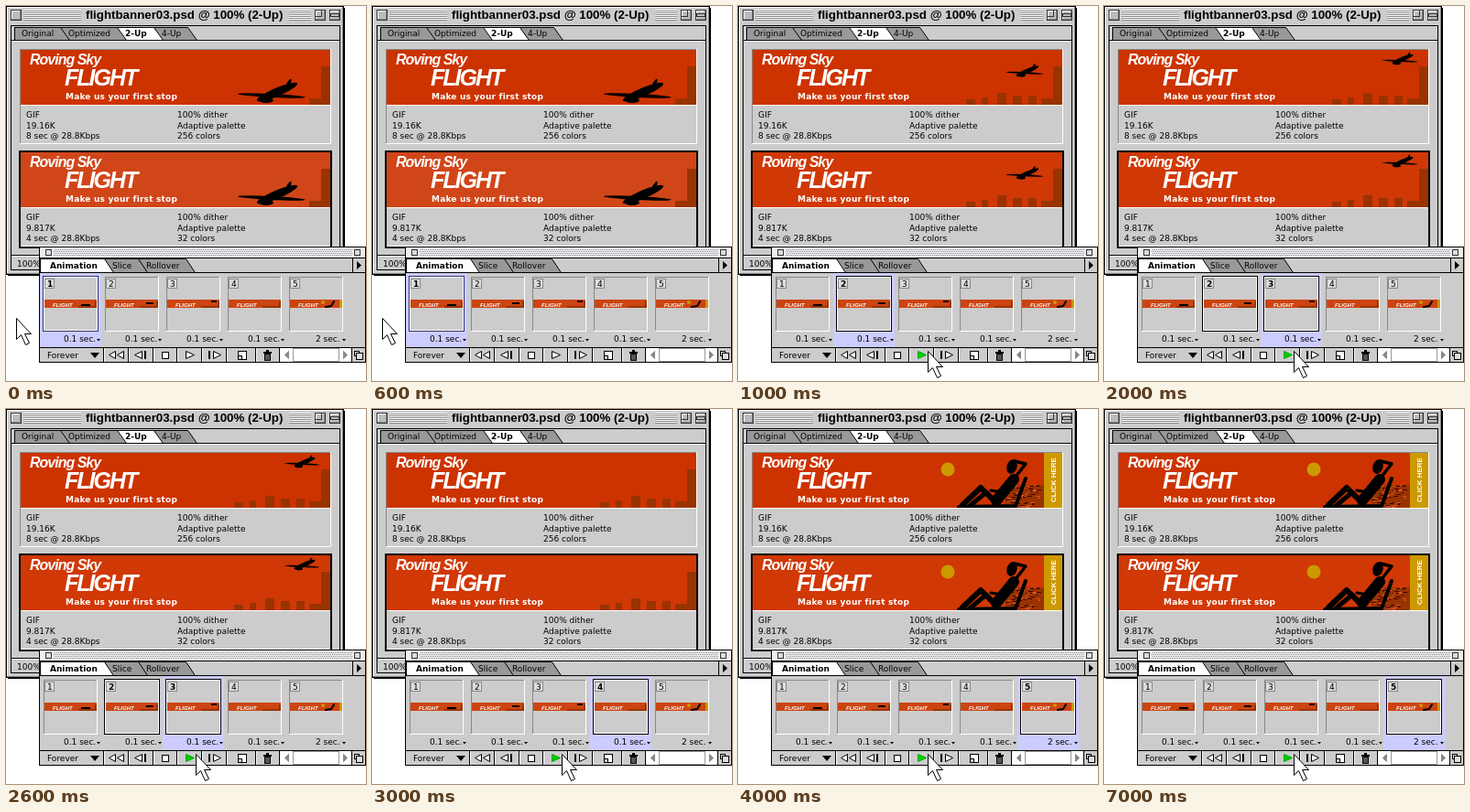
Animation, 393 px wide and 410 px high, one loop 9000 ms. Source, as an HTML page with a canvas:

```html
<!DOCTYPE html>
<html lang="en">
<head>
<meta charset="utf-8">
<style>
html, body { margin: 0; width: 100%; height: 100%; overflow: hidden; background: #fff; }
canvas { display: block; }
</style>
</head>
<body>
<canvas id="stage" width="393" height="410"></canvas>
<script>
const c = document.getElementById('stage').getContext('2d');
const SMALL = '9px "DejaVu Sans", sans-serif', BOLD = 'bold ' + SMALL;
const HEAD = '"Liberation Sans", Arial, sans-serif';
const GRAY = '#ccc', LILAC = '#ccf', RED = '#c30', DARK = '#930', GOLD = '#c90', BLACK = '#000';

function rect(x, y, w, h, fill) {
  c.fillStyle = fill;
  c.fillRect(x, y, w, h);
}
function frame(x, y, w, h, topLeft = BLACK, bottomRight = topLeft) {
  rect(x, y, w, 1, topLeft);
  rect(x, y, 1, h, topLeft);
  rect(x, y + h - 1, w, 1, bottomRight);
  rect(x + w - 1, y, 1, h, bottomRight);
}
function box(x, y, w, h, fill, line) {
  rect(x, y, w, h, fill);
  frame(x, y, w, h, line);
}
function path(points) {
  c.beginPath();
  for (let i = 0; i < points.length; i += 2) c.lineTo(points[i], points[i + 1]);
}
function poly(points, fill, line) {
  path(points);
  c.closePath();
  c.fillStyle = fill;
  c.fill();
  if (!line) return;
  c.lineWidth = 1;
  c.strokeStyle = line;
  c.stroke();
}
function limb(width, ...points) {
  path(points);
  c.lineWidth = width;
  c.lineCap = c.lineJoin = 'round';
  c.strokeStyle = BLACK;
  c.stroke();
}
function oval(x, y, rx, ry, tilt = 0, fill = BLACK) {
  c.beginPath();
  c.ellipse(x, y, rx, ry, tilt, 0, 7);
  c.fillStyle = fill;
  c.fill();
}
function text(s, x, y, font = SMALL, fill = BLACK, spacing = 0) {
  c.font = font;
  c.letterSpacing = spacing + 'px';
  c.fillStyle = fill;
  c.fillText(s, x, y);
}
// Runs draw with the origin moved, scaled and turned
function at(x, y, draw, scale = 1, turn = 0) {
  c.save();
  c.translate(x, y);
  c.scale(scale, scale);
  c.rotate(turn);
  draw();
  c.restore();
}
function random(seed) {
  return () => (seed = seed * 16807 % 2147483647) / 2147483647;
}
function stripes(x, y, w) {
  for (let i = 0; i < 6; i++) {
    rect(x, y + i * 2, w, 1, '#fff');
    rect(x, y + i * 2 + 1, w, 1, '#888');
  }
}

// Labels follow one another; each tab slants down at its right end
function tabs(labels, active, left, x, top, bottom) {
  const list = labels.map((label, i) => {
    const font = i === active ? BOLD : SMALL, start = x;
    c.font = font;
    c.letterSpacing = '0px';
    x += Math.round(c.measureText(label).width) + 16;
    return { label, font, start, end: x + 1.5, fill: i === active ? '#fff' : '#999' };
  });
  for (const t of list.reverse()) {
    poly([left + .5, top + .5, t.end - 10, top + .5, t.end, bottom + .5, left + .5, bottom + .5],
      t.fill, BLACK);
    text(t.label, t.start, bottom - 4, t.font);
  }
}

function plane() {
  oval(0, 0, 24, 4.5, -.4);
  oval(-6, 4, 37, 2, .05);
  oval(12, -8, 7, 2, -1.1);
  oval(-12, 9, 8, 3);
}

function skyline(whole) {
  rect(327, 16, 10, 42, DARK);
  rect(314, 51, 13, 7, DARK);
  if (!whole) return;
  const rnd = random(11);
  for (let x = 232; x < 325; x += 17) {
    const h = 6 + rnd() * 9 | 0;
    rect(x, 58 - h, 7 + rnd() * 8 | 0, h, DARK);
  }
}

function beach() {
  const rnd = random(5);
  rect(275, 33, 42, 25, DARK);
  for (let i = 0; i < 70; i++) {
    rect(275 + rnd() * 37 | 0, 33 + rnd() * 25 | 0, 2 + rnd() * 4 | 0, 1, i % 2 ? '#d52' : '#400');
  }
  oval(212, 16, 7.5, 7.5, 0, GOLD);
  limb(6, 228, 55, 248, 36, 264, 52);
  limb(5, 236, 56, 254, 41, 266, 53);
  limb(12, 265, 50, 284, 27);
  oval(282, 13, 5.5, 8, .3);
  limb(3.5, 286, 24, 297, 10, 285, 7);
  limb(3, 281, 29, 272, 41, 259, 39);
  limb(4, 224, 57, 286, 56, 297, 26);
  rect(317, -2, 20, 60, GOLD);
  at(330, 52, () => text('CLICK HERE', 0, 0, 'bold 8px ' + HEAD, '#fff'), 1, -Math.PI / 2);
}

function banner(y, color, n) {
  at(17, y, () => {
    c.beginPath();
    c.rect(-1, -2, 338, 60);
    c.clip();
    rect(-1, -2, 338, 60, color);
    if (n < 4) skyline(n > 0);
    else beach();
    if (n === 0) at(279, 44, plane);
    if (n === 1) at(299, 21, plane, .55);
    if (n === 2) at(309, 8, plane, .52);
    text('Roving Sky', 9, 14, 'italic bold 16px ' + HEAD, '#fff', -1);
    text('FLIGHT', 47, 37, 'italic bold 25px ' + HEAD, '#fff', -2);
    text('Make us your first stop', 48, 52, BOLD, '#fff', .2);
  });
}

function panel(y, color, n, info) {
  frame(15, y - 3, 340, 104, '#888', '#fff');
  banner(y, color, n);
  rect(16, y + 58, 338, 1, '#fff');
  info.forEach((s, i) => text(s, i < 3 ? 22 : 187, y + 72 + i % 3 * 11.5));
}

function mainWindow(n) {
  rect(2, 2, 368, 293, BLACK);
  box(0, 0, 369, 294, GRAY);
  frame(1, 1, 367, 292, '#fff', '#888');
  stripes(19, 4, 63);
  stripes(309, 4, 24);
  for (const x of [5, 337, 353]) {
    box(x, 4, 12, 12, '#bbb', '#333');
    frame(x + 1, 5, 10, 10, '#fff', '#888');
  }
  frame(337, 4, 8, 8, '#333');
  frame(354, 8, 10, 4, '#333');
  text('flightbanner03.psd @ 100% (2-Up)', 87, 14, 'bold 13.3px ' + HEAD);

  frame(5, 21, 360, 268);
  tabs(['Original', 'Optimized', '2-Up', '4-Up'], 2, 9, 17, 23, 37);
  rect(6, 37, 358, 1, BLACK);
  rect(6, 38, 358, 1, '#fff');

  panel(50, RED, n, ['GIF', '19.16K', '8 sec @ 28.8Kbps',
    '100% dither', 'Adaptive palette', '256 colors']);
  panel(162, n ? '#d03806' : '#d04619', n, ['GIF', '9.817K', '4 sec @ 28.8Kbps',
    '100% dither', 'Adaptive palette', '32 colors']);
  frame(14, 158, 342, 107);
  frame(15, 159, 340, 105);
  rect(6, 272, 358, 1, BLACK);
  rect(6, 273, 358, 1, '#fff');
  text('100%', 12, 285);
}

function cell(i, n) {
  const on = i === n, marked = on || i === 1 && n === 2;
  at(37 + i * 67, 292, () => {
    if (on) rect(0, 0, 67, 81, LILAC);
    rect(4, 4, 59, 60, GRAY);
    frame(4, 4, 59, 60, '#888', '#fff');
    if (marked) {
      frame(3, 3, 61, 61, n ? BLACK : '#336');
      frame(4, 4, 59, 59, '#fff');
    }
    box(5, 6, 11, 11, '#ddd', '#888');
    text(i + 1, 8, 15, marked ? BOLD : SMALL);
    rect(5, 29, 57, 9, '#c41');
    text('FLIGHT', 14, 37, 'italic bold 6px ' + HEAD, '#fff');
    if (i < 4) {
      rect(42, 36, 20, 2, DARK);
      rect(60, 31, 2, 7, DARK);
      if (i < 3) rect(45 + i * 4, 34 - i * 2, 10 - i * 2, 2, BLACK);
    } else {
      oval(41, 32, 2, 2, 0, GOLD);
      limb(2, 44, 37, 50, 36, 53, 31);
      rect(59, 29, 3, 9, GOLD);
    }
    text(i < 4 ? '0.1 sec.' : '2 sec.', i < 4 ? 26 : 33, 75);
    poly([62, 72, 66, 72, 64, 74.5], BLACK);
  });
}

// Sideways triangle; a negative width points left
function arrow(x, w, fill = '#fff', line = BLACK) {
  poly([x + .5, 377.5, x + w + .5, 381.5, x + .5, 385.5], fill, line);
}

function controls(playing) {
  rect(37, 373, 355, 16, GRAY);
  rect(299, 374, 78, 15, '#fff');
  frame(313, 374, 51, 15, '#999');
  rect(37, 373, 355, 1, BLACK);
  for (let i = 0; i < 8; i++) {
    const x = Math.round(106 + i * 26.75) + (i > 5 ? 5 : 0);
    rect(x, 374, 1, 15, BLACK);
    rect(x + 1, 374, 1, 15, '#fff');
  }
  text('Forever', 45, 385);
  poly([92, 379, 102, 379, 97, 385], BLACK);
  arrow(119, -7);
  arrow(128, -7);
  arrow(148, -8);
  rect(151, 377, 2, 9, BLACK);
  box(170, 378, 8, 8, '#fff');
  if (playing) arrow(196, 9, '#0c0', '#0a0');
  else arrow(196, 9);
  rect(221, 377, 2, 9, BLACK);
  arrow(226, 8);
  box(253, 377, 10, 10, '#fff');
  box(253, 382, 5, 5, GRAY);
  rect(281, 378, 9, 2, BLACK);
  rect(284, 376, 3, 2, BLACK);
  box(282, 380, 7, 8, '#555');
  arrow(308, -4, '#888', '#888');
  arrow(368, 4, '#888', '#888');
  rect(377, 374, 1, 15, BLACK);
  box(380, 377, 6, 6, '#ddd');
  box(382, 379, 8, 8, '#ddd');
}

function palette(n) {
  box(36, 263, 357, 127, GRAY);
  rect(37, 264, 355, 11, '#eee');
  for (let x = 52; x < 377; x += 2) {
    for (let y = 266; y < 273; y += 2) rect(x + y / 2 % 2, y, 1, 1, '#889');
  }
  for (const x of [43, 380]) box(x, 266, 7, 7, '#ddd', '#333');
  rect(37, 275, 355, 1, BLACK);
  tabs(['Animation', 'Slice', 'Rollover'], 0, 37, 48, 276, 291);
  rect(37, 291, 355, 1, BLACK);
  frame(378, 275, 15, 17);
  poly([383, 279, 388, 283.5, 383, 288], BLACK);
  for (let i = 0; i < 5; i++) cell(i, n);
  controls(n > 0);
}

function cursor(x, y) {
  at(x + .5, y + .5, () => poly([0, 0, 0, 23, 5, 18, 10, 29, 14, 27, 9, 17, 16, 17], '#fff', BLACK));
}

function draw(now) {
  const n = Math.min(4, Math.floor(now % 9000 / 1000));
  rect(0, 0, 393, 410, '#fff');
  mainWindow(n);
  palette(n);
  if (n) cursor(207, 377);
  else cursor(11, 341);
  requestAnimationFrame(draw);
}
draw(0);
</script>
</body>
</html>
```
